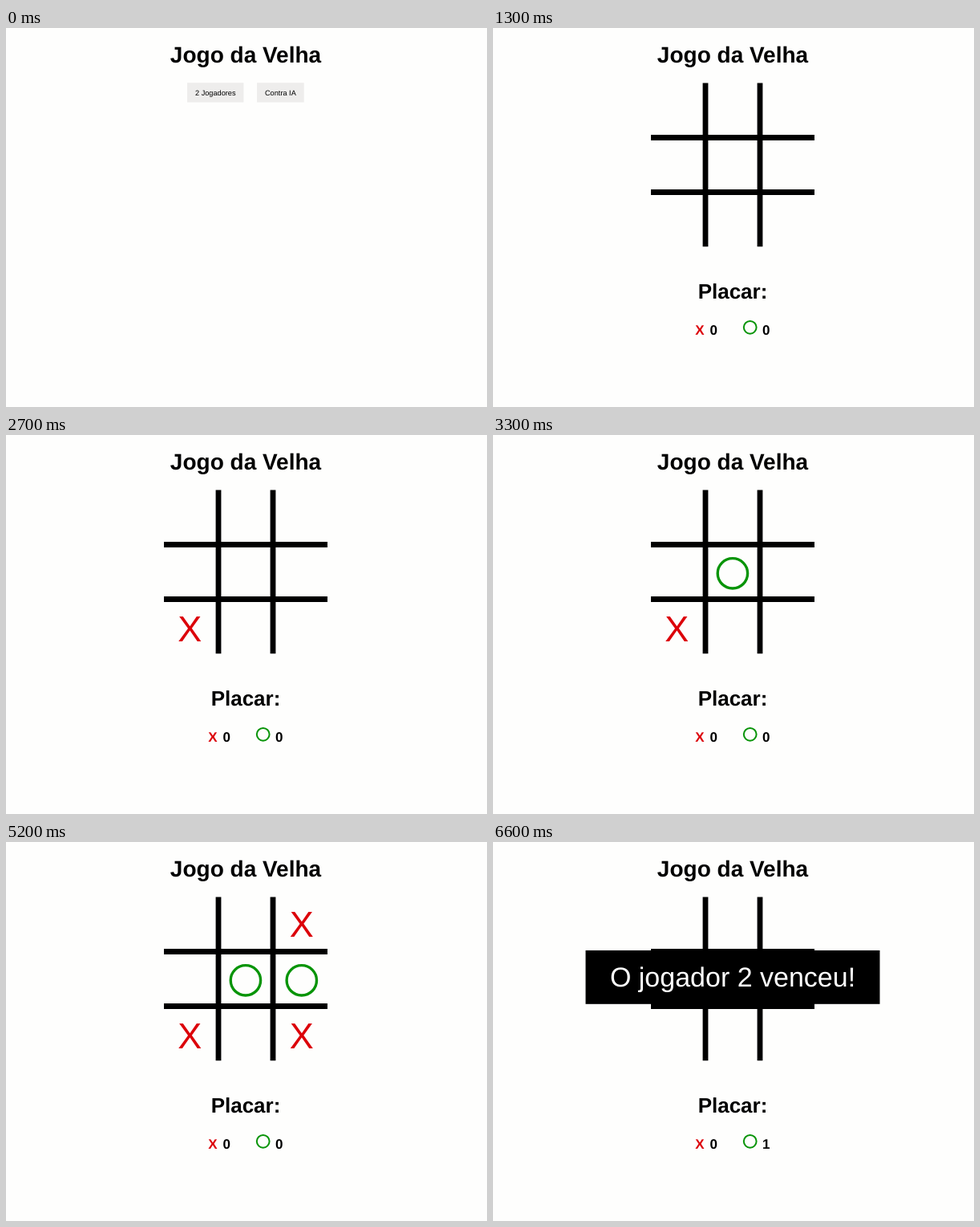
An HTML page that plays this animation: 600x472 px, repeating every 8 s.

```html
<!DOCTYPE html>
<html lang="pt">
<head>
<meta charset="utf-8">
<title>Jogo da Velha</title>
<style>
  html, body { margin: 0; width: 100%; height: 100%; overflow: hidden; background: #fefefd; }
  svg { display: block; width: 100vw; height: 100vh; }
  text { font-family: "Liberation Sans", Arial, sans-serif; text-rendering: geometricPrecision; }
  .mid { text-anchor: middle; }
  .bold { font-weight: bold; }
  .red { fill: #dc0009; }
  .ring { fill: none; stroke: #089408; }
</style>
</head>
<body>
<svg viewBox="0 0 600 472">
  <text class="mid bold" x="299" y="43" font-size="28">Jogo da Velha</text>

  <g id="menu" font-size="9.2">
    <rect x="226" y="68.3" width="70.4" height="24.2" fill="#eeedec"/>
    <rect x="313" y="68.3" width="58.7" height="24.2" fill="#eeedec"/>
    <text class="mid" x="261.3" y="83.5">2 Jogadores</text>
    <text class="mid" x="342.4" y="83.5">Contra IA</text>
  </g>

  <g id="game">
    <path d="M265 68.5V272.2M333 68.5V272.2M197 136.5H401M197 204.5H401" stroke="#000" stroke-width="6.8"/>
    <g id="marks"></g>
    <text class="mid bold" x="299" y="337" font-size="26">Placar:</text>
    <g class="bold" font-size="17">
      <text class="red" x="252.3" y="381.7">X</text>
      <text x="270.4" y="381.7">0</text>
      <circle class="ring" cx="320.7" cy="372.8" r="7.9" stroke-width="2"/>
      <text id="score" x="336" y="381.7">0</text>
    </g>
  </g>

  <g id="message">
    <rect x="115.5" y="135" width="367" height="66.8"/>
    <text class="mid" x="299" y="180" font-size="34" fill="#fff">O jogador 2 venceu!</text>
  </g>
</svg>
<script>
  const LOOP = 8000, START = 1300, WIN = 6600;
  const colX = [229.2, 298.9, 368.8];
  const rowX = [118, 188, 257.3];
  const rowO = [101.3, 172.3, 242];
  // time, player, column, row
  const moves = [
    [2700, "X", 0, 2], [3300, "O", 1, 1],
    [3900, "X", 2, 2], [4400, "O", 2, 1],
    [5200, "X", 2, 0], [5700, "O", 1, 0],
    [6100, "X", 0, 0]
  ];

  const get = id => document.getElementById(id);
  const menu = get("menu"), game = get("game"), message = get("message"), score = get("score");

  function add(tag, attrs, label = "") {
    const el = document.createElementNS("http://www.w3.org/2000/svg", tag);
    for (const key in attrs) el.setAttribute(key, attrs[key]);
    el.textContent = label;
    return get("marks").appendChild(el);
  }

  const marks = moves.map(([time, player, col, row]) => ({
    time,
    el: player === "X"
      ? add("text", { class: "mid red", x: colX[col], y: rowX[row], "font-size": 45 }, "X")
      : add("circle", { class: "ring", cx: colX[col], cy: rowO[row], r: 18.7, "stroke-width": 3.4 })
  }));

  const show = (el, on) => { el.style.display = on ? "" : "none"; };

  function render(t) {
    show(menu, t < 800);
    show(game, t >= START);
    for (const mark of marks) show(mark.el, t >= mark.time && t < WIN);
    show(message, t >= WIN);
    score.textContent = t >= WIN ? 1 : 0;
  }

  const origin = performance.now();
  function tick() {
    render((performance.now() - origin) % LOOP);
    requestAnimationFrame(tick);
  }
  tick();
</script>
</body>
</html>
```
